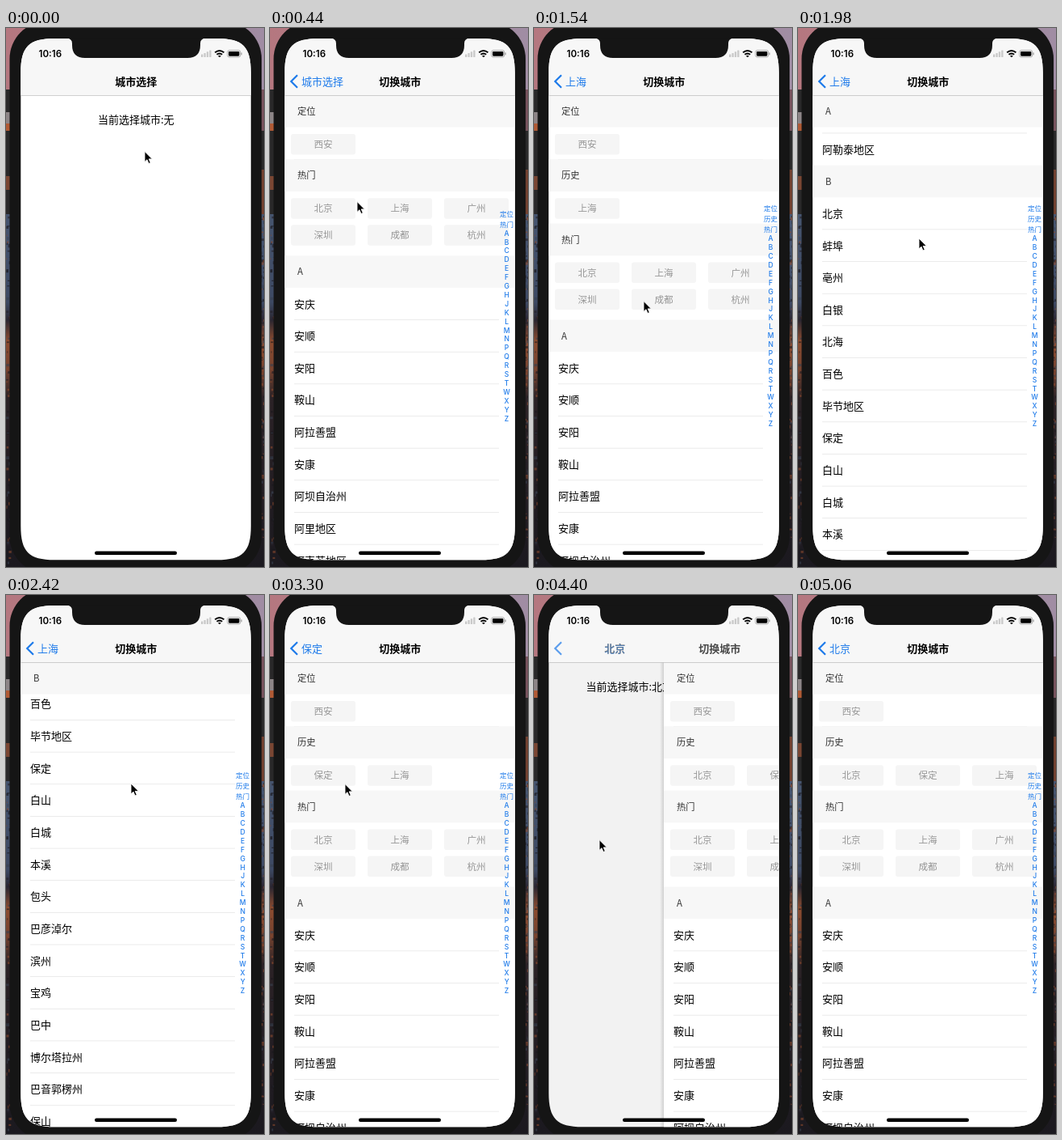
An HTML page that plays this animation: 320x666 px, repeating every 5.28 s.

```html
<!DOCTYPE html>
<html lang="zh-CN">
<head>
<meta charset="utf-8">
<title>城市选择</title>
<style>
html, body { margin: 0; width: 100%; height: 100%; overflow: hidden; background: #1c191c; }
svg { display: block; width: 320px; height: 666px; }
text { font-family: "Noto Sans CJK SC", "Noto Sans CJK JP", "Noto Sans CJK", sans-serif; }
.latin { font-family: Inter, "Noto Sans CJK SC", sans-serif; }
</style>
</head>
<body>
<svg viewBox="0 0 320 666" xmlns="http://www.w3.org/2000/svg">
  <defs>
    <clipPath id="screen"><path id="glass"/></clipPath>
    <linearGradient id="shade">
      <stop offset="0" stop-opacity="0"/>
      <stop offset="1" stop-opacity=".14"/>
    </linearGradient>
    <linearGradient id="sky">
      <stop offset="0" stop-color="#b5777f"/>
      <stop offset="1" stop-color="#a08da4"/>
    </linearGradient>
    <linearGradient id="rock" x2="0" y2="1">
      <stop offset="0" stop-color="#46556f"/>
      <stop offset=".25" stop-color="#3d4963"/>
      <stop offset=".3" stop-color="#2a2631"/>
      <stop offset=".36" stop-color="#8c4c30"/>
      <stop offset=".44" stop-color="#74422f"/>
      <stop offset=".52" stop-color="#2b2226"/>
      <stop offset="1" stop-color="#1b191f"/>
    </linearGradient>
  </defs>
  <rect width="320" height="76" fill="url(#sky)"/>
  <rect y="76" width="320" height="154" fill="#292829"/>
  <rect y="104" width="8" height="14" fill="#8d8587"/>
  <rect y="118" width="8" height="9" fill="#b05a35"/>
  <rect y="183" width="8" height="17" fill="#7a4633"/>
  <rect x="312" y="76" width="8" height="51" fill="#75525c"/>
  <rect x="312" y="175" width="8" height="55" fill="#70402f"/>
  <rect y="230" width="320" height="436" fill="url(#rock)"/>
  <g id="grain"></g>
  <rect x="4.5" y="-8" width="312.5" height="682" rx="46" fill="#151515"/>
  <g clip-path="url(#screen)">
    <rect x="18" y="13" width="286" height="645" fill="#fff"/>
    <g id="views"></g>
    <rect x="18" y="13" width="286" height="70" fill="#f7f7f7"/>
    <rect x="18" y="83" width="286" height=".7" fill="#bcbcbc"/>
    <g id="nav"></g>
    <rect x="110" y="646.5" width="102" height="4.5" rx="2.2"/>
  </g>
  <path d="M75 12.5Q82 13 82 19v2q0 16 16 16H225q16 0 16-16v-2q0-6 7-6.5z" fill="#151515"/>
  <text class="latin" x="40.5" y="36" font-size="11.6" font-weight="600">10:16</text>
  <g fill="#c9c9c9">
    <rect x="242" y="32.5" width="2.3" height="3.5" rx=".6"/>
    <rect x="245.4" y="31" width="2.3" height="5" rx=".6"/>
    <rect x="248.8" y="29.2" width="2.3" height="6.8" rx=".6"/>
    <rect x="252.2" y="27.4" width="2.3" height="8.6" rx=".6"/>
  </g>
  <g fill="none" stroke="#000" stroke-width="1.9">
    <path d="M259.2 30.2q5.6-4.6 11.2 0"/>
    <path d="M261.4 32.7q3.4-2.6 6.8 0"/>
    <path d="M264.8 36l-1.3-1.4q1.3-.9 2.6 0z" stroke-width="1"/>
  </g>
  <rect x="274.7" y="27.6" width="16" height="8.4" rx="2.2" fill="none" stroke="#999" stroke-width=".8"/>
  <rect x="276" y="28.9" width="13.4" height="5.8" rx="1.1"/>
  <rect x="291.4" y="30.2" width="1.2" height="3.2" rx=".6" fill="#999"/>
  <path id="cursor" d="M0 0V12.9L3 10.2 5 15 7.3 14 5.2 9.4H9.4z" stroke="#fff" stroke-width=".9"/>
</svg>
<script>
const LOOP = 5280, STEP = 220, SLIDE = 220;
const WIDTH = 286, LEFT = 18, MID = 161.2, TOP = 83, ROW = 39.65;
const BLUE = '#1f7bea';

const visits = [
  { push: 110, pop: 660, pick: '上海' },
  { push: 1210, pop: 2530, pick: '保定' },
  { push: 2970, pop: 3860, pick: '北京' },
  { push: 4290, pop: Infinity }
];
const hot = '北京 上海 广州 深圳 成都 杭州'.split(' ');
const cities = {
  A: '安庆 安顺 安阳 鞍山 阿拉善盟 安康 阿坝自治州 阿里地区 阿克苏地区 阿勒泰地区',
  B: '北京 蚌埠 亳州 白银 北海 百色 毕节地区 保定 白山 白城 本溪 包头 巴彦淖尔 滨州 宝鸡 巴中 博尔塔拉州 巴音郭楞州 保山',
  C: '重庆 滁州 池州 潮州 崇左 承德 沧州'
};
const letters = [...'ABCDEFGHJKLMNPQRSTWXYZ'];
const pointer = [
  [0, 172, 152.5], [220, 172, 152.5], [440, 108, 214.5], [660, 150, 222], [1100, 150, 224],
  [1540, 136, 337.5], [1760, 142, 400], [1980, 150, 260], [2200, 153, 300], [2420, 155, 233],
  [2640, 135, 218], [3300, 93, 233.5], [3740, 81, 302.5], [4620, 81, 302.5]
];

const $ = id => document.getElementById(id);
const clamp = (v, lo = 0, hi = 1) => Math.min(hi, Math.max(lo, v));
const smooth = x => x * x * (3 - 2 * x);
const slide = (t, start) => smooth(clamp((t - start) / SLIDE));

function label(str, x, y, size, { fill = '#000', anchor = 'start', weight = 400, opacity = 1, cls = '' } = {}) {
  return `<text class="${cls}" x="${x}" y="${y + size * .37}" font-size="${size}" fill="${fill}" ` +
    `text-anchor="${anchor}" font-weight="${weight}" opacity="${opacity}">${str}</text>`;
}
const box = (x, y, w, h, fill, extra = '') =>
  `<rect x="${x}" y="${y}" width="${w}" height="${h}" fill="${fill}" ${extra}/>`;
const line = y => box(30, y - .3, 254, .6, '#dedede');

// Rounded box whose corners ease gradually into the straight sides.
function softBox(x, y, w, h, e) {
  const k = e * .76, m = e - k;
  return `M${x} ${y + e}c0 ${-k} ${m} ${-e} ${e} ${-e}`.replace(`c0 ${-k} ${m} ${-e}`, `c0 ${-k} ${m} ${-e}`) +
    `h${w - 2 * e}c${k} 0 ${e} ${m} ${e} ${e}v${h - 2 * e}c0 ${k} ${-m} ${e} ${-e} ${e}` +
    `h${2 * e - w}c${-k} 0 ${-e} ${-m} ${-e} ${-e}z`;
}

function grain() {
  let seed = 7, out = '';
  const random = () => (seed = seed * 16807 % 2147483647) / 2147483647;
  const tones = ['#1a181d', '#241f25', '#8a4a2e', '#38404f'];
  for (let i = 0; i < 170; i++) {
    const x = random() < .5 ? random() * 4 : 316 + random() * 4;
    out += box(x, 232 + random() * 430, 1 + random() * 3, 1 + random() * 3,
      tones[Math.floor(random() * 4)], 'opacity=".6"');
  }
  return out;
}

function chips(names, top) {
  return names.map((name, i) => {
    const x = 26 + i % 3 * 95, y = top + 8.3 + Math.floor(i / 3) * 33;
    return box(x, y, 80, 25.5, '#f5f5f5', 'rx="3"') +
      label(name, x + 40, y + 12.8, 11.6, { fill: '#979797', anchor: 'middle' });
  }).join('');
}

function rows(names, top) {
  return names.map((name, i) => {
    const y = top + i * ROW;
    if (y > 670 || y < TOP - ROW) return '';
    return label(name, 30, y + ROW / 2, 13) + (i < names.length - 1 ? line(y + ROW) : '');
  }).join('');
}

function indexBar(history) {
  const words = history.length ? ['定位', '历史', '热门'] : ['定位', '热门'];
  let y = history.length ? 223 : 229.5;
  return [...words, ...letters].map((word, i) => {
    const out = label(word, 293.6, y, 8.5, { fill: BLUE, anchor: 'middle', weight: 500, cls: i < words.length ? '' : 'latin' });
    y += i < words.length - 1 ? 13.1 : 10.9;
    return out;
  }).join('');
}

function cityList(history, scroll) {
  const sections = [];
  let y = TOP - scroll, body = '';
  const add = (title, height, draw) => {
    sections.push({ title, y });
    body += draw(y + ROW);
    y += ROW + height;
  };
  add('定位', ROW, top => chips(['西安'], top) + line(top + ROW));
  if (history.length) add('历史', ROW, top => chips(history, top));
  add('热门', 79.3, top => chips(hot, top));
  for (const [letter, text] of Object.entries(cities)) {
    const names = text.split(' ');
    add(letter, names.length * ROW, top => rows(names, top));
  }
  // The current header stays under the bar until the next one pushes it away.
  const heads = sections.map((s, i) => {
    const next = sections[i + 1] ? sections[i + 1].y : Infinity;
    const top = Math.min(Math.max(s.y, TOP), next - ROW);
    return top < TOP - ROW || top > 666 ? '' :
      box(LEFT, top, WIDTH, ROW, '#f7f7f7') + label(s.title, 34, top + ROW / 2, 11.3, { fill: '#333' });
  }).join('');
  return box(LEFT, TOP, WIDTH, 575, '#fff') + body + heads + indexBar(history);
}

function navBar(p, title, back) {
  const home = (1 - p) ** 1.18;
  const backMid = 39 + back.length * 6.5;
  const x = backMid + (MID - backMid) * home;
  const mid = (str, at, opacity, fill, weight) => label(str, at, 66, 13, { fill, weight, opacity, anchor: 'middle' });
  return mid(title, x, 1 - p, '#000', 600) +
    mid(back, x, p, BLUE, 400) +
    mid('切换城市', MID + 138 * (1 - p), Math.sqrt(p), '#000', 600) +
    `<path d="M34 58.2L26.2 66l7.8 7.8" fill="none" stroke="${BLUE}" stroke-width="2.2" opacity="${Math.sqrt(p)}"/>`;
}

function pointerAt(t) {
  const i = pointer.findIndex(k => k[0] >= t);
  if (i < 0) return null;
  const b = pointer[i], a = pointer[i - 1] || b;
  const u = b === a ? 0 : (t - a[0]) / (b[0] - a[0]);
  return [a[1] + (b[1] - a[1]) * u, a[2] + (b[2] - a[2]) * u];
}

function render(t) {
  const n = Math.max(0, visits.filter(v => t >= v.push).length - 1);
  const visit = visits[n];
  const p = slide(t, visit.push) - slide(t, visit.pop);
  const history = visits.slice(0, n).map(v => v.pick).reverse();
  const before = history[0];
  const city = t >= visit.pop ? visit.pick : before;
  const scroll = n === 1 ? 919.8 * (1 - (1 - clamp((t - 1640) / 780)) ** 2) : 0;

  const homeShift = -.3 * WIDTH * p, listShift = WIDTH * (1 - p);
  let views = `<g transform="translate(${homeShift})">` +
    label('当前选择城市:' + (city || '无'), MID, 113, 13, { anchor: 'middle' }) + '</g>';
  if (p > 0) {
    views += box(LEFT, 13, WIDTH, 645, '#000', `opacity="${.1 * p}"`) +
      `<g transform="translate(${listShift})">` + box(LEFT - 5, TOP, 5, 575, 'url(#shade)') +
      cityList(history, scroll) + '</g>';
  }
  $('views').innerHTML = views;
  $('nav').innerHTML = navBar(p, city || '城市选择', before || '城市选择');

  const at = pointerAt(t);
  $('cursor').setAttribute('visibility', at ? 'visible' : 'hidden');
  if (at) $('cursor').setAttribute('transform', `translate(${at})`);
}

$('glass').setAttribute('d', softBox(18.3, 13, 285.5, 644.3, 42));
$('grain').innerHTML = grain();

const start = performance.now();
let shown = -1;
function tick() {
  const t = Math.floor((performance.now() - start) % LOOP / STEP) * STEP;
  if (t !== shown) render(shown = t);
  requestAnimationFrame(tick);
}
tick();
</script>
</body>
</html>
```
